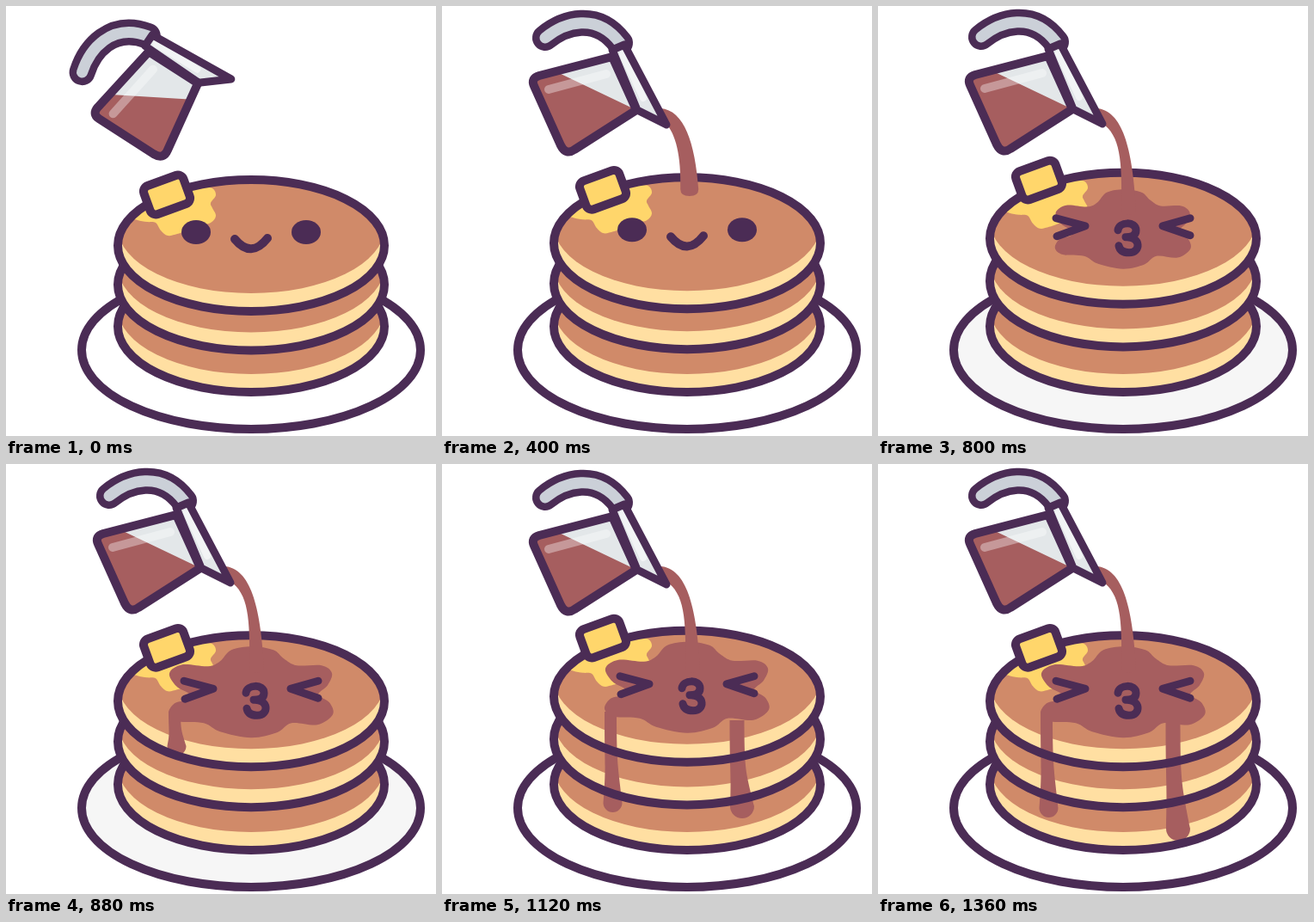
Recreate the animation shown at these times as an HTML page. Size 500 px wide and 500 px high, loop 1440 ms.

```html
<!DOCTYPE html>
<html lang="en">
<head>
<meta charset="utf-8">
<title>Pancakes</title>
<style>
html, body { margin: 0; width: 100%; height: 100%; overflow: hidden; background: #fff; }
svg { display: block; width: 100vw; height: 100vh; }
</style>
</head>
<body>
<svg id="stage" viewBox="0 0 500 500">
  <defs><clipPath id="disc"><ellipse cx="285" cy="278.5" rx="155" ry="76.5"/></clipPath></defs>
  <g id="scene"></g>
</svg>
<script>
const LOOP = 1440, STEP = 80;
const INK = '#4b2c55', CAKE = '#d08a69', CREAM = '#ffdfa2', BUTTER = '#ffd66b';
const SYRUP = '#a65e5f', GLASS = '#e3e7e9', STEEL = '#cbd0d8';
const scene = document.getElementById('scene');

const clamp = v => Math.max(0, Math.min(1, v));
const mix = (a, b, k) => a + (b - a) * k;
const lift = (t, size) => -size * (1 - Math.cos(2 * Math.PI * t / 480)) / 2;

// Value on a line through [time, value] pairs
function along(t, keys) {
  if (t <= keys[0][0]) return keys[0][1];
  for (let i = 1; i < keys.length; i++) {
    const [t0, v0] = keys[i - 1], [t1, v1] = keys[i];
    if (t <= t1) return mix(v0, v1, (t - t0) / (t1 - t0));
  }
  return keys[keys.length - 1][1];
}

// Closed smooth curve through points
function blob(p) {
  const n = p.length, at = i => p[(i + n) % n];
  let d = `M${p[0]}`;
  for (let i = 0; i < n; i++) {
    const [a, b, c, e] = [at(i - 1), at(i), at(i + 1), at(i + 2)];
    const c1 = [0, 1].map(j => b[j] + (c[j] - a[j]) / 6);
    const c2 = [0, 1].map(j => c[j] - (e[j] - b[j]) / 6);
    d += `C${c1} ${c2} ${c}`;
  }
  return d + 'Z';
}

const shape = (d, fill, more = '') => `<path d="${d}" fill="${fill}" ${more}/>`;
const line = (d, width = 10, color = INK, more = '') =>
  `<path d="${d}" fill="none" stroke="${color}" stroke-width="${width}" stroke-linecap="round" stroke-linejoin="round" ${more}/>`;
const move = (x, y, body) => `<g transform="translate(${x} ${y})">${body}</g>`;
const oval = (cx, cy, rx, ry, more) => `<ellipse cx="${cx}" cy="${cy}" rx="${rx}" ry="${ry}" ${more}/>`;

const MELT = [[145, 243], [153, 249], [164, 251], [174, 252], [180, 261], [188, 267], [199, 265],
  [208, 262], [222, 256], [238, 252], [244, 244], [240, 235], [238, 229], [244, 220], [240, 212],
  [228, 210], [205, 203], [165, 215]];
const POOL = [[286, 215], [262, 219], [249, 232], [235, 238], [205, 236], [190, 246], [198, 261],
  [213, 270], [211, 277], [196, 281], [189, 293], [200, 302], [230, 304], [249, 314], [285, 321],
  [315, 315], [332, 304], [362, 306], [380, 294], [376, 280], [363, 271], [374, 260], [379, 246],
  [367, 237], [338, 237], [323, 229], [311, 219]];

function pool(t) {
  const k = clamp((t - 470) / 400);
  if (k <= 0) return '';
  const ky = Math.pow(k, 0.72);
  return shape(blob(POOL.map(([x, y]) => [285 + (x - 285) * k, 266 + (y - 266) * ky])), SYRUP);
}

function drip(x, w, top, endX, r, end) {
  if (end <= top + r) return '';
  const y = end - r, m = mix(top, y, 0.6);
  return shape(`M${x - w} ${top}C${x - w} ${m} ${x - w + 2} ${m} ${endX - r} ${y}` +
    `A${r} ${r} 0 0 0 ${endX + r} ${y}C${x + w + 2} ${m} ${x + w} ${m} ${x + w} ${top}Z`, SYRUP);
}

function drips(t) {
  const left = along(t, [[780, 285], [880, 339], [960, 368], [1040, 392], [1120, 405], [1360, 411]]);
  const right = along(t, [[870, 300], [960, 345], [1040, 384], [1120, 412], [1200, 424], [1360, 438]]);
  return drip(196, 7, 288, 198.5, 11, left) + drip(343, 8.5, 298, 349, 14, right);
}

function pancake(y, toppings, syrup) {
  const clip = body => `<g clip-path="url(#disc)">${body}</g>`;
  return move(0, y,
    clip(oval(285, 278.5, 155, 76.5, `fill="${CREAM}"`) +
      oval(285, 257.5, 155, 76.5, `fill="${CAKE}"`) + toppings + move(0, -y, syrup)) +
    oval(285, 278.5, 155, 76.5, `fill="none" stroke="${INK}" stroke-width="10"`));
}

function face(t) {
  if (t >= 720) {
    return line('M207 255L241 264L208 276M363 255L331 264L363 275', 9) +
      line('M279 269C280 259 300 258 300 269C300 275 295 277 288 277C306 276 306 295 292 295C285 295 281 292 280 287', 9);
  }
  const ry = along(t, [[480, 14], [560, 12], [640, 7]]);
  return [221, 349].map(x => oval(x, 263, 17, ry, `fill="${INK}"`)).join('') +
    line('M266 271Q285 294 304 270');
}

function stream(t) {
  const end = along(t, [[240, 125], [320, 172], [400, 221], [480, 243]]);
  if (end <= 125) return '';
  const k = clamp((end - 120) / 115), y = end - 8;
  const right = mix(272, 300, Math.sqrt(k)), left = right - along(t, [[400, 21], [480, 17]]);
  const bend = mix(120, 165, k), settle = clamp((t - 400) / 80);
  return shape(`M254 119C${mix(266, 284, k)} 121 ${right - 4} ${bend} ${right} ${y}` +
    `Q${right} ${end} ${(left + right) / 2} ${end}Q${left} ${end} ${left} ${y}` +
    `C${left + 1} ${bend + 15} ${mix(272, 282, settle)} ${mix(142, 150, k)} 260 136Z`, SYRUP);
}

function jug(t) {
  const tilt = along(t, [[0, 0], [80, 0.6], [160, 1]]);
  const bob = 2 * Math.cos(2 * Math.PI * (t - 160) / 960);
  const body = 'M198 59L113 81Q103 84 107 93L138 162Q144 174 154 167L226 121Z';
  const handle = 'M120 37C142 19 180 7 207 43';
  const endX = mix(207, 224, tilt), endY = mix(131, 120, tilt);
  const art = line(handle, 30) + line(handle, 13, STEEL) +
    shape(body, GLASS) +
    shape(`M134 77L113 81Q103 84 107 93L138 162Q144 174 154 167L${endX} ${endY}Z`, SYRUP) +
    line('M124 97L191 79', 10, '#fff', 'opacity=".36"') +
    line(body) +
    shape('M198 51L212 45L261 138L227 121Z', GLASS) +
    line('M210 56L234 107', 8, '#fff', 'opacity=".55"') +
    line('M198 51L212 45L261 138L227 121Z', 9);
  return `<g transform="translate(${2 * (1 - tilt)} ${bob - 4 * (1 - tilt)}) rotate(${-33 * (1 - tilt)} 176 115)">${art}</g>`;
}

function draw(t) {
  const top = lift(t, 11), mid = lift(t, 5.5), runs = drips(t);
  const plate = t >= 480 && t < 1040 ? '#f6f6f6' : '#fff';
  scene.innerHTML =
    oval(285, 400, 197, 92, `fill="${plate}" stroke="${INK}" stroke-width="10"`) +
    pancake(94, '', runs) +
    pancake(45.5 + mid, '', runs) +
    pancake(top, shape(blob(MELT), BUTTER) + pool(t), runs) +
    stream(t) +
    move(0, top, face(t)) +
    move(187, 219.5 + lift(t, 22.6),
      `<rect x="-24.5" y="-17.5" width="49" height="35" rx="7" transform="rotate(-20)" fill="${BUTTER}" stroke="${INK}" stroke-width="10"/>`) +
    jug(t);
}

let shown = -1;
const start = performance.now();
function tick() {
  const t = Math.floor((performance.now() - start) % LOOP / STEP) * STEP;
  if (t !== shown) draw(shown = t);
  requestAnimationFrame(tick);
}
tick();
</script>
</body>
</html>
```
